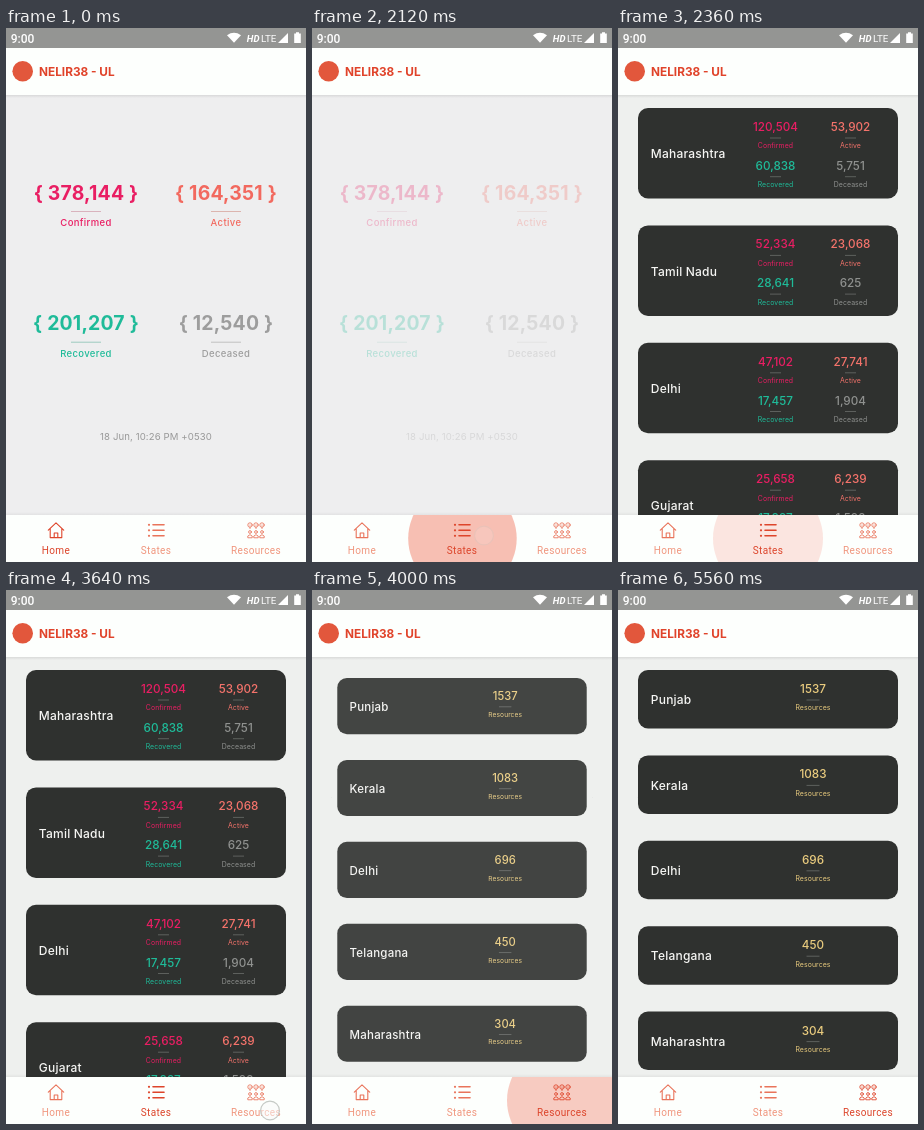
Recreate the animation shown at these times as an HTML page. Size 300 px wide and 534 px high, loop 5640 ms.

```html
<!DOCTYPE html>
<html lang="en">
<head>
<meta charset="utf-8">
<title>Case tracker</title>
<style>
html, body { margin: 0; width: 100%; height: 100%; overflow: hidden; background: #eef0ee; }
svg { display: block; width: 100vw; height: 100vh; }
text { font-family: Inter, "Open Sans", sans-serif; }
.mid { text-anchor: middle; }
.big { font-size: 19.4px; font-weight: 700; letter-spacing: .2px; }
.tag { font-size: 9.5px; font-weight: 450; letter-spacing: .36px; }
.name { font-size: 12px; font-weight: 500; letter-spacing: .22px; fill: #f6f6f4; }
.num { font-size: 11.7px; font-weight: 500; }
.cap { font-size: 6.9px; letter-spacing: .1px; }
.title { font-size: 11.8px; font-weight: 700; fill: #e0432a; }
.tab { color: #e9745b; --ink: #f0967e; }
.tab.on { color: #de452b; --ink: #dc452b; }
.tab text { font: 400 10px Roboto, sans-serif; letter-spacing: .36px; fill: var(--ink); }
.tab .line { fill: none; stroke: currentColor; stroke-width: 1.1; stroke-linejoin: round; stroke-linecap: round; }
.tab .fine { stroke-width: .85; }
.bar text { font-family: Roboto, sans-serif; fill: #fff; }
</style>
</head>
<body>
<svg id="stage" viewBox="0 0 300 534" preserveAspectRatio="none">
  <defs>
    <clipPath id="body"><rect y="67" width="300" height="420"/></clipPath>
    <clipPath id="nav"><rect y="487" width="300" height="47"/></clipPath>
    <linearGradient id="down" x2="0" y2="1">
      <stop stop-color="#000" stop-opacity=".09"/><stop offset="1" stop-color="#000" stop-opacity="0"/>
    </linearGradient>
    <linearGradient id="up" x2="0" y2="1">
      <stop stop-color="#000" stop-opacity="0"/><stop offset="1" stop-color="#000" stop-opacity=".05"/>
    </linearGradient>
  </defs>
  <rect id="back" width="300" height="534"/>
  <g id="pages"></g>

  <rect y="67" width="300" height="3" fill="url(#down)"/>
  <rect y="20" width="300" height="47" fill="#fdfffd"/>
  <circle cx="16.7" cy="43.3" r="10.3" fill="#e2573c"/>
  <text class="title" x="33" y="48.3">NELIR38 - UL</text>

  <g class="bar">
    <rect width="300" height="20" fill="#949593"/>
    <text x="4.8" y="14.6" font-size="12" font-weight="500">9:00</text>
    <path id="arrows" fill="#fff" d="M215.2 8.6l2-3.4 2 3.4zM215.2 10.2h4l-2 3.4z"/>
    <path fill="#fff" d="M221 7.2Q228 2.4 235 7.2L228 14.8z"/>
    <text x="240.8" y="13.6" font-size="9.6" font-weight="700" font-style="italic">HD</text>
    <text x="255" y="13.6" font-size="9.8">LTE</text>
    <path fill="#fff" d="M272 15L282 5V15z"/>
    <path fill="#fff" d="M288.2 5.6h1.8V4.2h3v1.4h1.8V15h-6.6z"/>
  </g>

  <rect y="484" width="300" height="3" fill="url(#up)"/>
  <rect y="487" width="300" height="47" fill="#fdfffd"/>
  <g clip-path="url(#nav)"><circle id="ripple" fill="#f7bfb3"/></g>
  <g id="tabs"></g>
  <circle id="touch" r="9.4" fill="#fafaf9" fill-opacity=".5" stroke="#c6cac6" stroke-width="1.2"/>
</svg>
<script>
const LOOP = 5640, STEP = 40;
const PINK = "#e91e63", CORAL = "#f2695f", GREEN = "#1fbb99";
const $ = id => document.getElementById(id);
const clamp = v => Math.min(1, Math.max(0, v));
const span = (t, from, to) => clamp((t - from) / (to - from));
const easeOut = p => 1 - (1 - p) ** 3;

const label = (cls, x, y, str, fill = "") =>
  `<text class="${cls}" x="${x}" y="${y}"${fill && ` fill="${fill}"`}>${str}</text>`;
const rule = (x, y, half, color) =>
  `<rect x="${x - half}" y="${y - .5}" width="${half * 2}" height="1" fill="${color}"/>`;
const card = (y, h, name) =>
  `<rect x="20" y="${y}" width="260" height="${h}" rx="10" fill="#2f312f"/>` +
  label("name", 32.8, y + h / 2 + 5, name);

function homeStat(x, y, value, name, color, line) {
  return label("mid big", x, y, `{ ${value} }`, color) +
    rule(x, y + 12, 15, line) + label("mid tag", x, y + 26.5, name, color);
}

function smallStat(x, y, value, name, color, half = 5.5) {
  return label("mid num", x, y, value, color) +
    rule(x, y + 7, half, "#5d605d") + label("mid cap", x, y + 17.4, name, color);
}

const home =
  homeStat(80, 171.5, "378,144", "Confirmed", PINK, "#d9b3bd") +
  homeStat(220, 171.5, "164,351", "Active", CORAL, "#dcb5af") +
  homeStat(80, 302.2, "201,207", "Recovered", GREEN, "#9dcbbf") +
  homeStat(220, 302.2, "12,540", "Deceased", "#9d9d9d", "#c0c0c0") +
  `<text class="mid" x="150" y="411.5" font-size="9.6" letter-spacing=".1" fill="#999">18 Jun, 10:26 PM +0530</text>`;

const states = [
  ["Maharashtra", "120,504", "53,902", "60,838", "5,751"],
  ["Tamil Nadu", "52,334", "23,068", "28,641", "625"],
  ["Delhi", "47,102", "27,741", "17,457", "1,904"],
  ["Gujarat", "25,658", "6,239", "17,827", "1,592"]
].map(([name, confirmed, active, recovered, deceased], i) => {
  const y = 80 + i * 117.4;
  return card(y, 90.5, name) +
    smallStat(157.5, y + 23, confirmed, "Confirmed", PINK) +
    smallStat(232.5, y + 23, active, "Active", "#f4736b") +
    smallStat(157.5, y + 61.7, recovered, "Recovered", GREEN) +
    smallStat(232.5, y + 61.7, deceased, "Deceased", "#8f918f");
}).join("");

const resources = [
  ["Punjab", 1537], ["Kerala", 1083], ["Delhi", 696], ["Telangana", 450], ["Maharashtra", 304]
].map(([name, count], i) => {
  const y = 80 + i * 85.4;
  return card(y, 58.5, name) + smallStat(195, y + 23, count, "Resources", "#e9cb7e", 6.5);
}).join("");

$("pages").innerHTML = [home, states, resources]
  .map(p => `<g clip-path="url(#body)">${p}</g>`).join("");

const houseIcon = `<path class="line" d="M42.3 502.2L50 494.8l7.7 7.4M44.2 500.8v8.8h11.6v-8.8M48.2 509.6v-4.6h3.6v4.6"/>`;
const listIcon = [496.8, 502.3, 507.8].map(y =>
  `<circle cx="143" cy="${y}" r="1.1" fill="currentColor"/>` +
  `<path class="line" style="stroke-width:1.6" d="M147 ${y}h11"/>`).join("");
const peopleIcon = [244, 250, 256].map(x =>
  `<circle class="line fine" cx="${x}" cy="497" r="2.2"/><path class="line fine" d="M${x} 499.3v1.2"/>` +
  `<circle cx="${x}" cy="497" r=".6" fill="currentColor"/>` +
  `<circle class="line fine" cx="${x}" cy="504" r="1.4"/>` +
  `<path class="line fine" d="M${x - 2.2} 509.4v-1.4q2.2 -2.6 4.4 0v1.4z"/>`).join("");

$("tabs").innerHTML = [["Home", houseIcon], ["States", listIcon], ["Resources", peopleIcon]]
  .map(([name, icon], i) => `<g class="tab">${icon}${label("mid", 50 + i * 100, 525.6, name)}</g>`).join("");

const pages = [...$("pages").children], tabs = [...$("tabs").children];

// Each tap: touch time and place, the tab it opens, start of the incoming page.
const taps = [
  { at: 1920, x: 172, y: 507.5, tab: 1, enter: 2143 },
  { at: 3640, x: 264, y: 520.5, tab: 2, enter: 3888 }
];

function showPage(i, scale, alpha) {
  pages.forEach((p, k) => p.style.display = k === i && alpha > 0 ? "" : "none");
  pages[i].setAttribute("opacity", alpha);
  pages[i].setAttribute("transform", `translate(150 277) scale(${scale}) translate(-150 -277)`);
}

function drawTap(tap, t) {
  const ripple = $("ripple"), touch = $("touch");
  ripple.style.display = touch.style.display = tap ? "" : "none";
  if (!tap) return;
  const age = t - tap.at;
  const grow = easeOut(span(age, 40, 260));
  const cx = 50 + tap.tab * 100;
  ripple.setAttribute("opacity", span(age, 60, 160) * (1 - span(age, 320, 520)));
  ripple.setAttribute("cx", tap.x + (cx - tap.x) * grow);
  ripple.setAttribute("cy", tap.y + (510.5 - tap.y) * grow);
  ripple.setAttribute("r", 18 + 37 * grow);
  touch.setAttribute("cx", tap.x);
  touch.setAttribute("cy", tap.y);
  touch.setAttribute("opacity", 1 - span(age, 80, 240));
}

function draw(now) {
  const t = Math.floor(now % LOOP / STEP) * STEP;
  const tap = taps.filter(p => t >= p.at).pop();
  let page = 0, scale = 1, alpha = 1, active = 0;
  if (tap) {
    const entered = t >= tap.enter;
    page = entered ? tap.tab : tap.tab - 1;
    active = t >= tap.enter - 80 ? tap.tab : tap.tab - 1;
    if (entered) {
      alpha = easeOut(span(t, tap.enter, tap.enter + 210));
      scale = .6 + .4 * alpha;
    } else {
      alpha = 1 - span(t, tap.enter - 90, tap.enter);
    }
  }
  showPage(page, scale, alpha);
  tabs.forEach((g, i) => g.classList.toggle("on", i === active));
  $("back").setAttribute("fill", page ? "#eef0ee" : "#eeeeef");
  $("arrows").style.display = t >= 4440 && t < 5440 ? "" : "none";
  drawTap(tap, t);
}

function tick() {
  draw(performance.now());
  requestAnimationFrame(tick);
}
tick();
</script>
</body>
</html>
```
